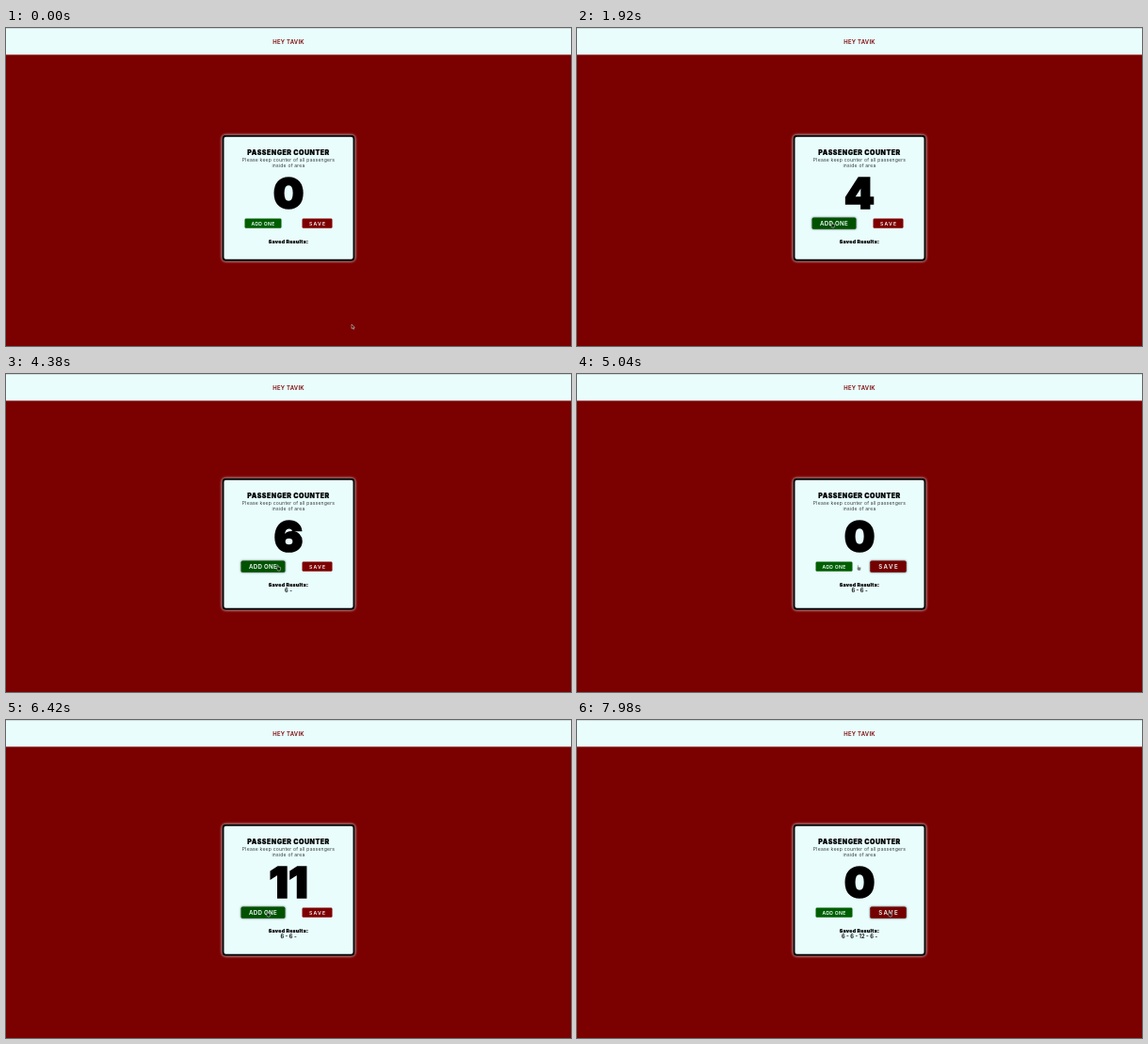
These frames come from a looping animation (600 px wide and 338 px high, 8 s). An HTML page:

```html
<!DOCTYPE html>
<html lang="en">
<head>
<meta charset="utf-8">
<title>Passenger counter</title>
<style>
  html, body { margin: 0; width: 100%; height: 100%; overflow: hidden; background: #7b0000; }
  svg { display: block; width: 600px; height: 338px; font-family: Inter, "Open Sans", sans-serif; }
  text { text-anchor: middle; white-space: pre; }
  .paper { fill: #e9fdfd; }
  .hello { font-size: 5.9px; font-weight: 600; letter-spacing: .3px; fill: #7b0000; }
  #card { stroke: #050505; stroke-width: 2; filter: drop-shadow(0 0 1.6px #fff); }
  .title { font-size: 7px; font-weight: 900; letter-spacing: .5px; stroke: #000; stroke-width: .2; }
  .note { font-size: 5.1px; font-weight: 300; letter-spacing: .22px; }
  #count { font-size: 46px; font-weight: 900; stroke: #000; stroke-width: 1.6; }
  .btn text { font-size: 5.1px; font-weight: 600; letter-spacing: .28px; fill: #f4ffff; }
  .btn .spaced { letter-spacing: 1.25px; }
  .label { font-size: 5.2px; font-weight: 900; letter-spacing: .25px; stroke: #000; stroke-width: .15; }
  #results { font-size: 5.8px; font-weight: 600; }
  #cursor { fill: #0008; stroke: #e4ece4; stroke-width: .5; }
</style>
</head>
<body>
<svg viewBox="0 0 600 338">
  <rect width="600" height="338" fill="#7b0000"/>
  <rect class="paper" width="600" height="28.4"/>
  <rect width="600" height=".8" fill="#cbd5d5"/>
  <text class="hello" x="300" y="16.9">HEY TAVIK</text>

  <rect id="card" class="paper" x="230.5" width="139" rx="3"/>
  <g id="content">
    <text class="title" x="300" y="134.5">PASSENGER COUNTER</text>
    <text class="note" x="300" y="141.7">Please keep counter of all passengers</text>
    <text class="note" x="300" y="148.4">inside of area</text>
    <text id="count" x="300" y="192.4"></text>
    <g id="add" class="btn">
      <rect x="-19.5" y="-5.1" width="39" height="10.2" rx="1.3"/>
      <text y="1.9">ADD ONE</text>
    </g>
    <g id="save" class="btn">
      <rect x="-16" y="-5.1" width="32" height="10.2" rx="1.3"/>
      <text class="spaced" x=".6" y="1.9">SAVE</text>
    </g>
    <text class="label" x="300" y="228.7">Saved Results:</text>
    <text id="results" x="300" y="235"></text>
  </g>

  <g id="cursor">
    <path id="arrow" d="M0 0V4.5L1.1 3.6 1.9 5.3 2.7 4.9 1.9 3.3H3.3Z"/>
    <path id="hand" d="M1 .4Q1.5-.3 2 .4V2L4.6 2.6V4.2L4 6H1.7L0 3.4 1 3.5Z"/>
  </g>
</svg>
<script>
  const LOOP = 8000, STEP = 60, FADE = 300;
  const $ = id => document.getElementById(id);

  // each round: n evenly spaced clicks at pointer x, then one on SAVE
  const rounds = [
    { start: 1140, gap: 250, n: 6, save: 3000, x: 269 },
    { start: 3460, gap: 130, n: 6, save: 4800, x: 287 },
    { start: 5225, gap: 115, n: 12, save: 6820, x: 276 },
    { start: 7070, gap: 85, n: 6, save: 7920, x: 279 }
  ];

  const buttons = [
    { el: $('add'), x: 273, rest: [0, 95, 0], hot: [0, 82, 0],
      spans: rounds.map(r => [r.start - 150, r.save - 290]) },
    { el: $('save'), x: 330.5, rest: [126, 0, 0], hot: [116, 0, 0],
      spans: rounds.map((r, i) => [r.save - 220, (rounds[i + 1]?.start ?? 2 * LOOP) - 180]) }
  ];

  // pointer glides: from, to, target x and y
  const glides = [[60, 360, 305, 247], [540, 990, 269, 206]];
  rounds.forEach((r, i) => {
    if (i) glides.push([r.start - 260, r.start - 130, r.x, 203]);
    glides.push([r.save - 310, r.save - 150, 330, 203]);
  });

  const clamp = v => Math.min(1, Math.max(0, v));
  const mix = (a, b, k) => a + (b - a) * k;
  const smooth = p => p * p * (3 - 2 * p);
  const bez = (a, b, s) => 3 * a * s * (1 - s) ** 2 + 3 * b * s * s * (1 - s) + s ** 3;

  // the CSS "ease" curve
  function ease(p) {
    p = clamp(p);
    let lo = 0, hi = 1;
    for (let i = 0; i < 18; i++) {
      const mid = (lo + hi) / 2;
      if (bez(.25, .25, mid) < p) lo = mid; else hi = mid;
    }
    return bez(.1, 1, lo);
  }

  const hoverLevel = (spans, t) => spans.reduce(
    (sum, [on, off]) => sum + ease((t - on) / FADE) - ease((t - off) / FADE), 0);

  const pointerAt = t => glides.reduce(([x, y], [from, to, x1, y1]) => {
    const k = smooth(clamp((t - from) / (to - from)));
    return [mix(x, x1, k), mix(y, y1, k)];
  }, [367, 315]);

  function draw(t) {
    const done = rounds.filter(r => r.save <= t);
    const now = rounds[done.length];
    const lift = done.length ? 3 : 0;
    const clicked = now ? Math.floor((t - now.start) / now.gap) + 1 : 0;

    $('card').setAttribute('y', 114.7 - lift);
    $('card').setAttribute('height', 132 + 2 * lift);
    $('content').setAttribute('transform', `translate(0 ${-lift})`);
    $('count').textContent = now ? Math.min(now.n, Math.max(0, clicked)) : 0;
    $('results').textContent = done.map(r => r.n + ' -').join(' ');

    let pointing = false;
    for (const { el, x, rest, hot, spans } of buttons) {
      const k = hoverLevel(spans, t), box = el.firstElementChild;
      const over = spans.some(([on, off]) => t >= on && t < off);
      const color = rest.map((c, i) => Math.round(mix(c, hot[i], k)));
      el.setAttribute('transform', `translate(${x} 207.7) scale(${1 + .2 * k})`);
      box.style.fill = `rgb(${color})`;
      box.style.filter = over ? 'drop-shadow(0 0 1px #000a)' : 'none';
      pointing ||= over;
    }

    $('cursor').setAttribute('transform', `translate(${pointerAt(t)})`);
    $('arrow').style.display = pointing ? 'none' : '';
    $('hand').style.display = pointing ? '' : 'none';
  }

  const begin = performance.now();
  function tick() {
    const t = (performance.now() - begin) % LOOP;
    draw(Math.floor(t / STEP) * STEP);
    requestAnimationFrame(tick);
  }
  tick();
</script>
</body>
</html>
```
